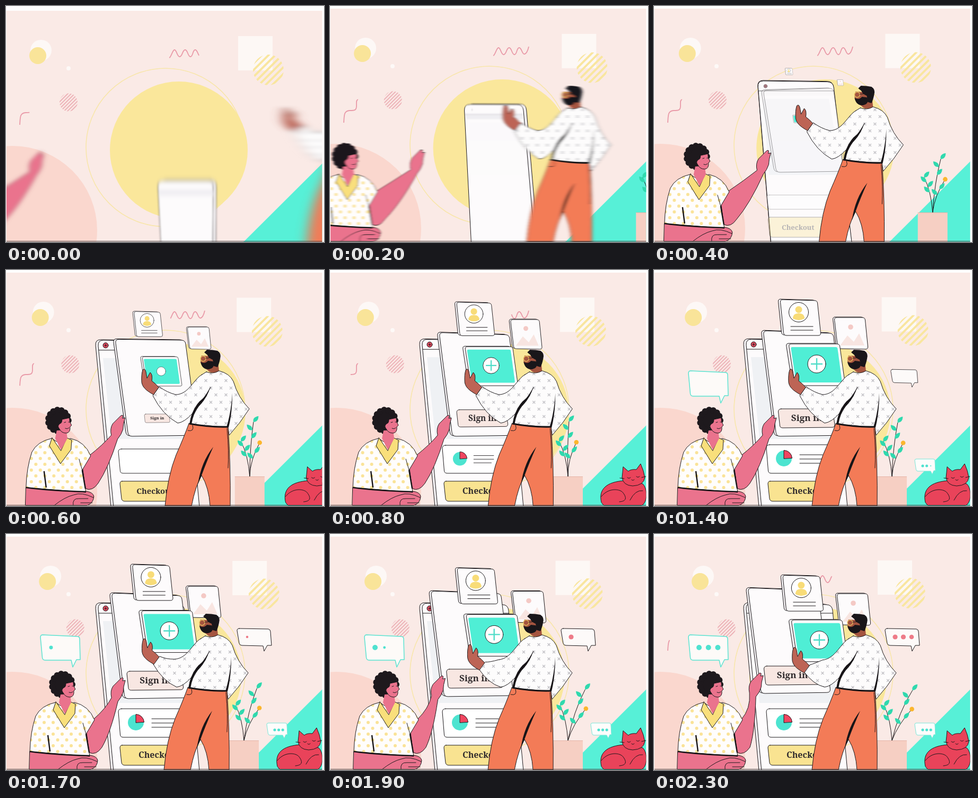
Write an HTML page that moves like this. It is 600 px wide and 447 px high and loops after 2.4 s.

```html
<!DOCTYPE html>
<html lang="en">
<head>
<meta charset="utf-8">
<title>Checkout illustration</title>
<style>
html, body { margin: 0; width: 100%; height: 100%; overflow: hidden; background: #fefefe; }
svg { display: block; width: 100%; height: 100%; }
.ink { stroke: #1b181b; stroke-width: 1; stroke-linejoin: round; stroke-linecap: round; }
.line { fill: none; }
.skin { fill: #ea738d; }
text { font: 600 17px "Noto Serif", "Liberation Serif", serif; fill: #302b2d; }
</style>
</head>
<body>
<svg viewBox="0 0 600 447" preserveAspectRatio="none">
  <defs>
    <clipPath id="stage"><rect x="1" width="595.5" height="447"/></clipPath>
    <pattern id="pinkStripes" width="4.6" height="4.6" patternUnits="userSpaceOnUse" patternTransform="rotate(45)"><path d="M1.2 0V4.6" stroke="#e9a3ab" stroke-width="1.6"/></pattern>
    <pattern id="yellowStripes" width="9" height="9" patternUnits="userSpaceOnUse" patternTransform="rotate(45) translate(4.5)"><path d="M3 0V9" stroke="#f9e69f" stroke-width="4"/></pattern>
    <pattern id="dots" width="17" height="22" patternUnits="userSpaceOnUse"><rect width="17" height="22" fill="#fffdfc"/><g fill="#fae398"><circle cx="4" cy="5" r="3"/><circle cx="12.500" cy="16" r="3"/></g></pattern>
    <pattern id="crosses" width="19" height="27" patternUnits="userSpaceOnUse"><rect width="19" height="27" fill="#fdfcfc"/><path d="M2 5l5 5m0-5l-5 5M11.500 18l5 5m0-5l-5 5" stroke="#bcbbc0" stroke-width="1.1"/></pattern>
    <filter id="manBlur" x="-30%" width="160%"><feGaussianBlur/></filter>
    <filter id="womanBlur" x="-30%" width="160%"><feGaussianBlur/></filter>
    <filter id="phoneBlur" x="-20%" width="140%"><feGaussianBlur/></filter>
  </defs>
  <g clip-path="url(#stage)">
    <g id="scene">
      <rect y="5" width="600" height="450" fill="#faeae6"/>
      <circle id="whiteDisc" cy="80" r="20" fill="#fdf8f6"/>
      <circle id="yellowDisc" cy="90" r="16" fill="#f9e499"/>
      <circle cx="118" cy="114" r="4" fill="#fdf9f7"/>
      <g id="pinkDisc"><circle r="17" fill="url(#pinkStripes)"/></g>
      <g id="square"><rect width="65" height="65" fill="#fdf8f5"/></g>
      <g id="yellowStripe"><circle r="29" fill="url(#yellowStripes)"/></g>
      <circle cx="301" cy="264" r="150" fill="none" stroke="#f8e6ab" stroke-width="1.6"/>
      <circle id="sun" cy="269" r="130" fill="#fae79b"/>
      <circle cx="12" cy="421" r="160" fill="#fad7ce"/>
      <path d="M444 447L598 293V447Z" fill="#57f0d7"/>
      <g fill="none" stroke="#e99aa8" stroke-width="1.8">
        <path id="wave" pathLength="100" d="M308 94C312 93 314 79 318 79S323 93 328 92S333 79 338 79S343 92 348 92S352 79 357 79S362 92 367 91Q372 90 375 77"/>
        <path id="hook" pathLength="100" d="M26 221C27 206 26 199 37 198C46 198 50 198 50 189C50 183 49 178 53 177"/>
      </g>

      <g id="phone"></g>
      <g id="phoneItems">
        <g id="chart">
          <path class="ink" fill="#fff" d="M218 331H335V385H221Q216 385 215.500 380L212 337Q212 331 218 331Z"/>
          <g id="pie"><circle cx="245" cy="357" r="15" fill="#4ce4d0"/><path class="ink" stroke-width=".7" d="M245 357V341.500A15.500 15.500 0 0 1 260.500 356Z" fill="#f04560"/><path class="ink line" d="M275 350H318M275 358H318M275 366H313"/></g>
        </g>
        <path class="ink" fill="#f9e391" d="M219 400H340V438H224Q219 438 218 433L215 405Q215 400 219 400Z"/>
        <text id="checkout" y="424">Checkout</text>
      </g>
      <g id="panel"></g>
      <g id="signIn">
        <path class="ink" fill="#f8e7e2" d="M240 263H337L341 293Q341 298 336 298L243 299Q238 299 237.500 295L234.500 268Q235 263 240 263Z"/>
        <text x="288" y="286" text-anchor="middle">Sign in</text>
      </g>
      <g id="avatar"></g>
      <g id="picture"></g>
      <g id="media"></g>

      <g id="woman">
        <path id="womanArm" class="ink skin"/>
        <path class="ink skin" d="M45 412L158 419Q172 421 173 429Q172 442 160 446H44Z"/>
        <path class="ink line" d="M98 446Q118 430 135 426Q150 420 172 431M134 446Q132 432 145 433H162M148 441H170"/>
        <path class="ink" fill="url(#dots)" d="M93 319Q66 325 56 345Q46 375 45 412L158 421L151 379L167 352Q156 325 129 319L111 330Z"/>
        <path class="line" stroke="#171417" stroke-width="2.4" d="M45 412Q90 418 158 420M151 379L157 414M79 381L83 412"/>
        <path class="ink line" d="M151 379L145 358"/>
        <g id="hair" fill="#1e191d"></g>
        <path class="ink" fill="#f9df7b" d="M94 318L89 333L110 367L130 340L131 322L122 318L111 342Z"/>
        <path class="skin" d="M103 304L100 319L111 341L123 319L121 303Z"/>
        <path class="ink skin" stroke-width=".6" d="M113 283L127 280Q126 288 131 294L128 297Q129 308 121 309Q112 309 108 301Q103 295 109 291Q113 290 113 283Z"/>
        <path class="ink line" d="M117 289l3-1M125 288l2 0M119 300q4 2 7-1"/>
      </g>

      <g id="plant">
        <g id="leaves"></g>
        <rect x="421" y="391" width="56" height="56" fill="#f6cfc3"/>
        <path d="M421 391.500H477" stroke="#e6b4a7"/>
      </g>

      <g id="man">
        <path fill="#f37b57" class="ink" stroke-width=".7" d="M343 291L417 297Q422 370 421 447H383Q381 412 367 389Q355 410 348 447H298Q303 390 319 350Q334 316 343 291Z"/>
        <path fill="#171417" d="M389 335Q366 364 360 406L367 389Q376 364 389 335Z"/>
        <path class="ink line" d="M341 304Q354 307 350 294M415 300Q419 345 417 375"/>
        <path fill="#a4543f" d="M367 162Q363 171 367 180L382 193Q391 197 400 192L397 164Z"/>
        <path class="ink" fill="url(#crosses)" d="M376 193Q388 198 400 191Q420 196 427 211Q436 242 457 263Q440 290 419 313L417 298L345 292Q349 266 360 245L350 222Q356 203 376 193Z"/>
        <path id="sleeve" class="ink" fill="url(#crosses)"/>
        <path fill="#171417" d="M384 220Q378 242 362 258Q351 272 348 292L344 292Q348 265 363 249Q378 237 384 220ZM425 233Q425 270 418 298L414 298Q423 268 425 233Z"/>
        <path class="line" stroke="#171417" stroke-width="3" d="M344 291Q380 298 417 297"/>
        <path id="manHand" class="ink" stroke-width=".7" fill="#bd6455" d="M276 236C268 231 256 225 254 213Q253 198 256 189Q260 185 262 193L264 205L270 194Q275 198 273 210Q280 215 286 222Z"/>
        <path fill="#19161a" d="M372 156L377 151Q388 151 397 153Q405 158 402 168Q400 178 397 184L390 182L388 170Q380 167 378 161ZM365 174Q373 179 379 172L388 173Q394 185 381 188Q368 189 365 174Z"/>
        <circle cx="370" cy="168" r="5" fill="none" stroke="#e6bd5f" stroke-width="1.4"/>
        <path class="ink line" d="M375 167L387 166"/>
      </g>

      <g id="cat" class="ink" fill="#e9435a">
        <path d="M512 440C506 415 522 401 556 399L590 405C599 413 600 440 588 446H517Z"/>
        <path class="line" d="M512 429C525 412 547 414 553 422S561 438 546 439M566 436Q576 416 590 418"/>
        <path d="M553 373Q552 385 551 393Q553 408 571 409Q592 408 594 393Q592 380 586 367L578 378Q568 377 563 381Z"/>
        <path class="line" d="M561 393q3 3 6 0M578 391q3 3 6 0M569 397q2 3 5 0M547 394l8 1M588 393l8-2"/>
      </g>

      <g id="bubbleLeft">
        <path fill="#fdfaf8" stroke="#5ae3d1" stroke-width="1.500" stroke-linejoin="round" d="M69 191L134 194Q139 194 139 199L140 238H133L126 252L123 239H74Q69 239 68.500 234L65 196Q65 191 69 191Z"/>
        <g class="dots" fill="#4fe2d0"></g>
      </g>
      <g id="bubbleRight">
        <path class="ink" fill="#fdfaf9" d="M440 179L495 180Q499 181 499 185L501 211H493L487 222L485 212L445 211Q441 211 440 207L436 183Q436 179 440 179Z"/>
        <g class="dots" fill="#ee7b88"></g>
      </g>
      <g id="bubbleCat">
        <path fill="#fefcfb" stroke="#78e7d8" d="M495 358H527Q530 358 530 361L531 380H528L525 387L522 381H498Q495 381 494.500 378L492 361Q492 358 495 358Z"/>
        <g class="dots" fill="#4fe2d0"></g>
      </g>
    </g>
    <path d="M0 445.500H600" stroke="#4b4647" stroke-width="1.2"/>
  </g>
</svg>
<script>
const LOOP = 2400, STEP = 100;
const $ = id => document.getElementById(id);
const set = (id, attrs) => { for (const k in attrs) $(id).setAttribute(k, attrs[k]); };
const move = (id, x, y = 0) => set(id, { transform: `translate(${x} ${y})` });
const grow = (id, s, ax, ay, x = 0, y = 0, sx = s) => set(id, {
  transform: `translate(${ax + x} ${ay + y}) scale(${sx} ${s}) translate(${-ax} ${-ay})`,
  visibility: s > 0.01 ? "visible" : "hidden"
});

// Easing over the time span a..b, and a decay for things flying in.
const ramp = (t, a, b) => Math.min(1, Math.max(0, (t - a) / (b - a)));
const smooth = (t, a, b) => { const u = ramp(t, a, b); return u * u * (3 - 2 * u); };
const easeOut = (t, a, b) => 1 - (1 - ramp(t, a, b)) ** 3;
const decay = (t, tau) => Math.exp(-((t / tau) ** 1.2));
const mix = (a, b, u) => a + (b - a) * u;

function roundPoly(pts, r) {
  const toward = (a, b) => {
    const k = r / Math.hypot(b[0] - a[0], b[1] - a[1]);
    return [mix(a[0], b[0], k), mix(a[1], b[1], k)];
  };
  return pts.map((p, i) => {
    const n = pts.length, a = toward(p, pts[(i + n - 1) % n]), b = toward(p, pts[(i + 1) % n]);
    return `${i ? "L" : "M"}${a}Q${p} ${b}`;
  }).join("") + "Z";
}
const shape = (pts, fill, r = 5, extra = 'class="ink"') => `<path ${extra} fill="${fill}" d="${roundPoly(pts, r)}"/>`;
const slab = (pts, depth, r = 5) =>
  shape(pts.map(([x, y]) => [x + depth, y - 1]), "#f4f1f3", r) + shape(pts, "#fdfbfc", r);

$("avatar").innerHTML = slab([[238, 56], [308, 58], [315, 124], [245, 124]], -4) + `
  <circle class="ink" cx="273" cy="80" r="18.500" fill="#fff"/>
  <g fill="#f8dc78"><circle cx="273" cy="75" r="6.500"/><path d="M262 92Q262 82 273 82T284 92Q273 98 262 92Z"/></g>
  <path class="ink line" d="M258 107H300M258 114H300"/>`;
$("picture").innerHTML = slab([[340, 90], [398, 90], [404, 150], [347, 149]], -3) + `
  <path d="M351 143L365 124L377 136L387 120L397 143Z" fill="#f8e5e1"/><circle cx="371" cy="108" r="4.800" fill="#f4c9c5"/>`;
$("media").innerHTML = slab([[254, 140], [350, 140], [361, 219], [266, 219]], -5) +
  shape([[258, 146], [346, 146], [355, 213], [268, 213]], "#4feed5", 3, "") +
  `<g id="plus"><circle class="ink" cx="307" cy="178" r="17" fill="#fff"/>
  <path id="cross" d="M307 167V189M296 178H318" stroke="#4fdcc8" stroke-width="2.4"/></g>`;

const curls = 15;
$("hair").innerHTML = '<circle cx="106" cy="285" r="21"/>' + Array.from({ length: curls }, (_, i) => {
  const a = i * 2 * Math.PI / curls;
  return `<circle cx="${106 + 19 * Math.cos(a)}" cy="${285 + 20 * Math.sin(a)}" r="6"/>`;
}).join("");

function typingDots(id, x, gap, y, r, start, delay) {
  const group = document.querySelector(`#${id} .dots`);
  group.innerHTML = [0, 1, 2].map(i => `<circle cx="${x + i * gap}" cy="${y}"/>`).join("");
  return t => [...group.children].forEach((dot, i) =>
    dot.setAttribute("r", r * easeOut(t, start + i * delay, start + i * delay + 250)));
}
const typing = [
  typingDots("bubbleLeft", 85, 17.7, 215, 5, 1620, 230),
  typingDots("bubbleRight", 455, 15.5, 195, 4.6, 1650, 250),
  typingDots("bubbleCat", 507, 7.6, 371, 2.6, 1100, 130)
];

function trim(id, from, to) {
  set(id, { "stroke-dasharray": `0 ${100 * from} ${100 * (to - from)} 300`, visibility: to > from ? "visible" : "hidden" });
}
function blur(id, x, y) {
  $(id + "Blur").firstElementChild.setAttribute("stdDeviation", `${x} ${y}`);
  if (x + y > 0.8) set(id, { filter: `url(#${id}Blur)` });
  else $(id).removeAttribute("filter");
}

function drawDecor(t) {
  const u = (t / 2300) ** 1.3;
  move("scene", 0, 4 * (1 - easeOut(t, 0, 200)));
  set("whiteDisc", { cx: mix(66, 93, u) });
  set("yellowDisc", { cx: mix(60, 87, u) });
  move("pinkDisc", mix(118, 137, u), 178.5);
  move("square", mix(438, 422, u), mix(53, 50, u));
  move("yellowStripe", mix(495, 483, u), mix(117, 112, u));
  set("sun", { cx: mix(326, 310, t / 2300) });
  const v = t < 1500 ? t + LOOP : t;
  const erased = smooth(v, LOOP + 550, LOOP + 1050);
  trim("wave", erased, ramp(v, 2200, 2440));
  trim("hook", erased, ramp(v, 2170, 2560));
}

function drawPhone(t) {
  const turn = smooth(t, 0, 560), spread = smooth(t, 100, 600);
  const x = mix(286, 173, turn), y = 131 + 196 * decay(t, 165), w = mix(105, 163, spread);
  const left = mix(293, 204, turn), right = mix(390, 366, spread);
  $("phone").innerHTML =
    slab([[x, y], [x + w, y + 3 * spread], [right, 460], [left, 460]], mix(6, -5, smooth(t, 150, 600)), 11) +
    `<path d="M${x + 2} ${y + 17}H${x + w - 1}l2 11H${x + 4}Z" fill="#eeedf1" opacity="${1 - spread}"/>
    <g opacity="${spread}">
      <path d="M${x + 10} ${y + 34}H${x + w - 8}L${right - 20} 320H${left - 5}Z" fill="#eff1f4"/>
      <path class="ink line" d="M${x + 2} ${y + 19}H${x + w + 1}"/>
      <circle class="ink" cx="${x + 15}" cy="${y + 10}" r="${5 * spread}" fill="#d94a5e"/>
      <path class="ink" d="M${x + 13} ${y + 10}h4m-2-2v4"/>
    </g>`;
  blur("phone", 1.4 * decay(t, 165), 4 * decay(t, 165));

  set("phoneItems", { opacity: ramp(t, 300, 600) });
  grow("chart", mix(0.5, 1, easeOut(t, 400, 1000)), 245, 385, 0, 0, 1);
  grow("pie", easeOut(t, 600, 1000), 245, 357);
  const zoom = easeOut(t, 500, 900);
  set("checkout", { x: mix(241, 250, zoom), style: `font-size:${mix(13, 16, zoom)}px` });
}

function drawCards(t) {
  const s = easeOut(t, 350, 1100), drift = smooth(t, 1400, 2350), late = smooth(t, 1550, 2400), early = smooth(t, 1400, 2100);
  const px = -29 * drift, py = -13 * drift, top = 55 * (1 - s);
  $("panel").innerHTML = slab([[206, 115 + top], [338, 120 + top * 0.8], [362, 313], [231, 315]], -4, 7);
  set("panel", { opacity: ramp(t, 300, 550) });
  move("panel", px, py);
  grow("signIn", easeOut(t, 500, 1050), 283, 281, px * 0.94, py);
  grow("avatar", s, 250, 132, 5 * late, 23 * late);
  grow("picture", s, 347, 151, 5 * early, 23 * early);
  grow("media", s, 264, 222, 5 * drift, 23 * drift);
  grow("plus", easeOut(t, 400, 1000), 300, 182);
  set("cross", { opacity: ramp(t, 600, 800) });
}

function drawPeople(t) {
  const drift = smooth(t, 1400, 2350), lower = smooth(t, 1400, 2100), reach = 1 - smooth(t, 200, 650);
  const arrive = decay(t, 225);
  move("woman", -185 * arrive);
  blur("woman", 5 * arrive, 3 * arrive * arrive);
  const hx = 25 * reach - 25 * drift, hy = -3 * reach - 12 * drift;
  const at = (x, y) => `${x + hx} ${y + hy}`;
  set("womanArm", { d: `M165 351Q${190 + hx * 0.3} 331 ${at(205, 313)}Q${at(202, 300)} ${at(208, 291)}
    L${at(223, 276)}Q${at(229, 273)} ${at(226, 281)}L${at(231, 280)}Q${at(227, 293)} ${at(227, 302)}
    Q${at(224, 312)} ${at(217, 320)}Q${200 + hx * 0.4} 375 181 404Q170 420 157 414L152 377Z` });

  const rush = decay(t, 160);
  move("man", 270 * rush);
  blur("man", 11 * rush, 2 * rush);
  const dx = 7 * lower, dy = 27 * lower;
  set("sleeve", { d: `M368 198C352 206 343 236 318 ${236 + dy * 0.1}Q302 ${232 + dy / 2} ${287 + dx} ${221 + dy}
    L${275 + dx} ${238 + dy * 0.8}Q${293 + dx} ${274 + dy * 0.4} 322 290Q347 287 384 222` });
  move("manHand", dx, dy);
}

function drawPlant(t) {
  const away = 1 - smooth(t, 0, 700);
  move("plant", 195 * away);
  move("cat", 280 * away);
  const sway = 6 - 20 * Math.cos((t - 950) * 2 * Math.PI / 2600);
  const bend = (x, y, k) => {
    const d = sway * k * (391 - y) / 106;
    return [x + d, y + d * 0.25];
  };
  const base = [449, 391];
  // A curved stem with leaves on alternating sides, from the tip down.
  const stem = (mid, tip, count, first) => {
    let out = `<path class="ink line" d="M${base}Q${mid} ${tip}"/>`;
    for (let i = 0; i < count; i++) {
      const u = first - i * 0.16;
      const [x, y] = [0, 1].map(a => (1 - u) ** 2 * base[a] + 2 * u * (1 - u) * mid[a] + u * u * tip[a]);
      out += `<path transform="translate(${x} ${y}) rotate(${i % 2 ? -135 : -50})" fill="#2fd9ae" d="M0 0Q6-8 15 0Q6 7 0 0Z"/>`;
    }
    return out;
  };
  const flower = bend(472, 328, 0.95);
  $("leaves").innerHTML = stem(bend(452, 335, 0.7), bend(463, 290, 1), 3, 1) +
    stem(bend(452, 360, 1), flower, 2, 0.7) + stem([446, 350], bend(433, 325, 0.1), 4, 1) +
    `<circle cx="${flower[0]}" cy="${flower[1]}" r="4.300" fill="#fbb62d"/>`;
}

function drawBubbles(t) {
  grow("bubbleLeft", easeOut(t, 900, 1400), 125, 252);
  grow("bubbleRight", easeOut(t, 1200, 1700), 486, 222);
  grow("bubbleCat", easeOut(t, 900, 1400), 525, 386);
  typing.forEach(draw => draw(t));
}

let shown = -1;
function tick(now) {
  const t = Math.floor(now % LOOP / STEP) * STEP;
  if (t !== shown) {
    shown = t;
    [drawDecor, drawPhone, drawCards, drawPeople, drawPlant, drawBubbles].forEach(draw => draw(t));
  }
  requestAnimationFrame(tick);
}
tick(0);
</script>
</body>
</html>
```
